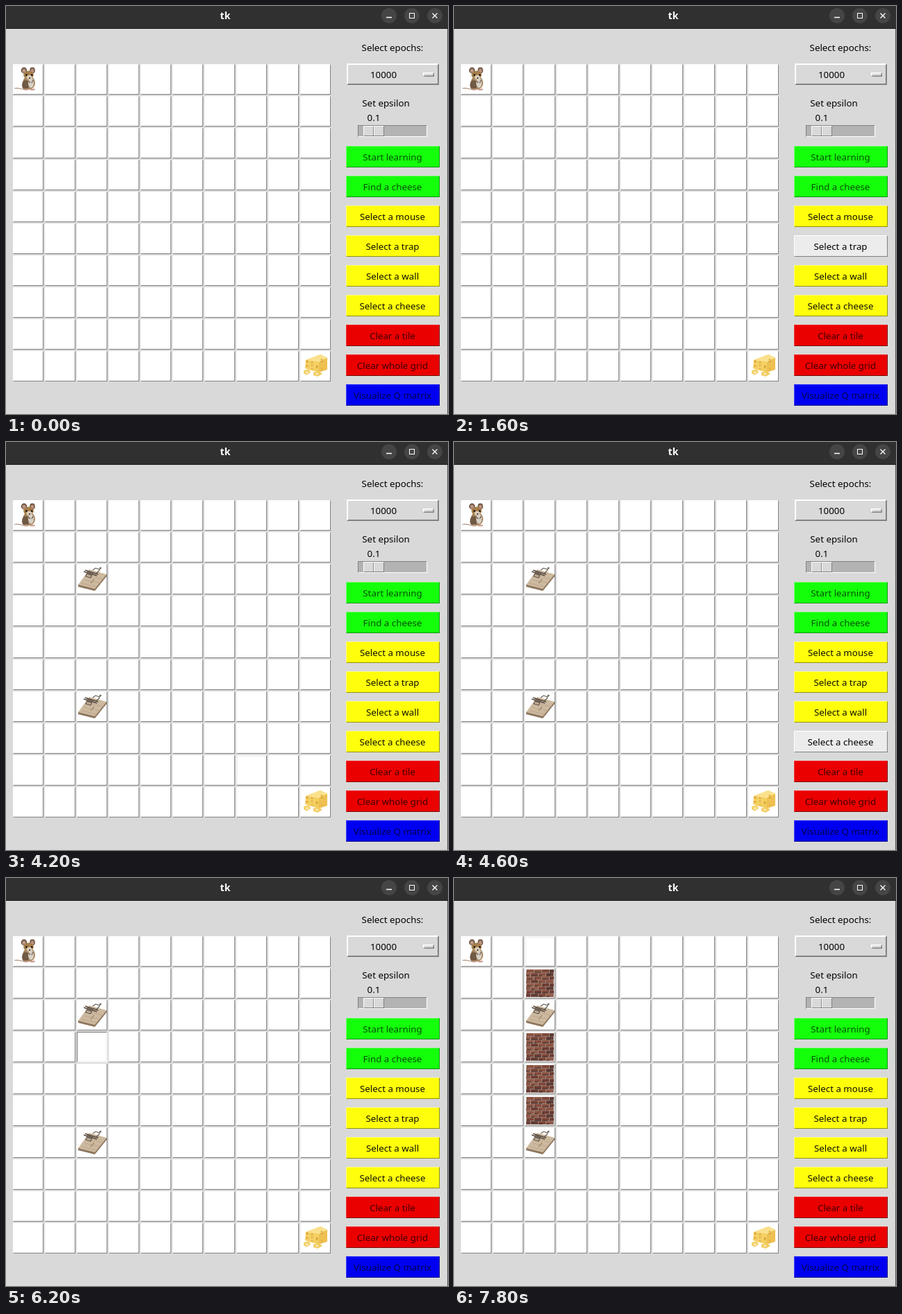
Recreate the animation shown at these times as an HTML page. Size 637 by 589 pixels, loop 8000 ms.

```html
<!DOCTYPE html>
<html lang="en">
<head>
<meta charset="utf-8">
<title>tk</title>
<style>
html, body { margin: 0; width: 100%; height: 100%; overflow: hidden; background: #d9d9d9; }
svg { display: block; width: 637px; height: 589px; }
text { font: 13.333px "Noto Sans", "Open Sans", sans-serif; text-anchor: middle; }
</style>
</head>
<body>
<svg id="stage" viewBox="0 0 637 589" xmlns="http://www.w3.org/2000/svg"></svg>
<script>
const LOOP = 8000, PITCH = 46, ACTIVE = '#ececec', LIGHT = '#fff', SHADE = '#828282';
const stage = document.getElementById('stage');

const rect = (x, y, w, h, fill, more = '') =>
  `<rect x="${x}" y="${y}" width="${w}" height="${h}" fill="${fill}" ${more}/>`;
const poly = (points, fill, more = '') => `<polygon points="${points}" fill="${fill}" ${more}/>`;
const line = (d, stroke, width = 1) =>
  `<path d="${d}" fill="none" stroke="${stroke}" stroke-width="${width}"/>`;
const oval = (x, y, rx, ry, fill) => `<ellipse cx="${x}" cy="${y}" rx="${rx}" ry="${ry}" fill="${fill}"/>`;
const label = (x, y, text, fill = '#000', more = '') =>
  `<text x="${x}" y="${y}" fill="${fill}" ${more}>${text}</text>`;

// Bevelled box: light top-left edge, dark bottom-right edge
function bevel(x, y, w, h, face, light, dark, b = 1) {
  return rect(x, y, w, h, dark) +
    poly(`${x},${y} ${x + w},${y} ${x + w - b},${y + b} ${x + b},${y + h - b} ${x},${y + h}`, light) +
    rect(x + b, y + b, w - 2 * b, h - 2 * b, face);
}

function mulberry(seed) {
  return () => {
    seed = seed + 0x6d2b79f5 | 0;
    let n = Math.imul(seed ^ seed >>> 15, 1 | seed);
    n = n + Math.imul(n ^ n >>> 7, 61 | n) ^ n;
    return ((n ^ n >>> 14) >>> 0) / 4294967296;
  };
}

function wallArt() {
  const rnd = mulberry(12);
  const tones = ['#7e4538', '#8d5141', '#6c3a32', '#925a49', '#5e3a33', '#84493b'];
  let s = rect(2, 2, 40, 40, '#a08b7e');
  for (let row = 0; row < 8; row++) {
    for (let x = row % 2 ? -4 : 1; x < 40; x += 11) {
      const left = Math.max(0, x), right = Math.min(40, x + 10);
      s += rect(2 + left, 2.3 + row * 5, right - left, 4.1, tones[rnd() * 6 | 0]);
      s += rect(2 + left, 5.4 + row * 5, (right - left) * rnd(), 1.2, '#43302b');
    }
  }
  return s;
}

const trapArt = () =>
  poly('2,30 2,33 26,39 43,18 43,15', '#8d775f') +
  poly('2,30 18,8 43,15 26,36', '#cdb99f') +
  line('M7 28 29 33 M11 23 34 28 M15 17 39 22', '#b9a287', .8) +
  line('M10 11 29 17 M12 9 31 15', '#55483e', 1.4) +
  line('M16 11 13 18 20 20 23 13 M23 9 27 6 33 8 35 5 M28 14 33 9', '#5d544b', 1.1) +
  poly('15,11 23,12 21,17 14,15', '#6f6256') +
  line('M25 22 20 28', '#a58d72', 1.4) +
  oval(34, 6, 1.5, 1.3, '#776a5e');

const mouseArt = () =>
  line('M20 36 C13 38 10 33 2 35', '#b08f7b', 1.2) +
  oval(23, 27, 9, 9.5, '#a4835c') +
  oval(18, 30, 5, 7, '#6f5a44') +
  oval(26, 27, 4, 7, '#d8d2ca') +
  oval(16, 9, 4.3, 4.4, '#6b533f') + oval(16, 9.5, 2.7, 3, '#bb9383') +
  oval(28, 9, 3.8, 4.4, '#6b533f') + oval(28, 9.5, 2.3, 3, '#bb9383') +
  oval(22.5, 15.5, 7.3, 6, '#a57d48') +
  oval(23.5, 19, 4, 3.3, '#d9cbb8') +
  oval(19.4, 15.5, 1.4, 1.6, '#201a17') + oval(27.2, 15.5, 1.3, 1.6, '#201a17') +
  oval(24, 20, 1.2, .9, '#493630') +
  line('M22 24 25 27 M29 23 27 27', '#72614f', 1.4) +
  oval(19, 36.5, 4, 1.3, '#c8a18d') + oval(28, 36.5, 4, 1.3, '#c8a18d');

function cheeseArt() {
  const rnd = mulberry(5);
  let s = poly('8,13 29,5 39,10 39,27 26,31 7,25', '#f4cf62') +
    poly('8,13 29,5 39,10 27,16', '#fbe18d') +
    poly('27,16 39,10 39,27 26,31', '#eec052') +
    poly('5,28 13,26 15,31 9,35 5,32', '#f5d36c') +
    poly('19,31 27,29 32,33 25,37 19,35', '#f3cd63');
  for (let i = 0; i < 13; i++) {
    s += oval(10 + (i * 7 % 28), 12 + rnd() * 14, .8 + rnd(), .7 + rnd() * .8, '#d9a239');
  }
  return s + oval(10, 31, 1.5, 1.4, '#fff3cc') + oval(24, 33, 1.7, 1.3, '#fff3cc');
}

const art = { mouse: mouseArt(), cheese: cheeseArt(), trap: trapArt(), wall: wallArt() };

const GREEN = ['#14ff0a', '#71ff6b', '#0b9406', '#084f06'];
const YELLOW = ['#ffff0c', '#ffff78', '#929208', '#101000'];
const RED = ['#eb0000', '#f53030', '#780000', '#3d0000'];
const BLUE = ['#0000f0', '#3838ff', '#000080', '#00004c'];
const buttons = [
  ['start', 'Start learning', GREEN], ['find', 'Find a cheese', GREEN],
  ['mouse', 'Select a mouse', YELLOW], ['trap', 'Select a trap', YELLOW],
  ['wall', 'Select a wall', YELLOW], ['cheese', 'Select a cheese', YELLOW],
  ['tile', 'Clear a tile', RED], ['grid', 'Clear whole grid', RED],
  ['matrix', 'Visualize Q matrix', BLUE],
];

// [time, widget under the pointer, pressed]; tiles are "row,col"
const pointer = [
  [0, ''], [400, 'tile'], [600, 'cheese'], [800, 'wall'], [1000, 'trap'],
  [1400, 'trap', 1], [1600, 'trap'], [1800, '5,8'], [2000, '3,4'], [2200, '2,2'],
  [2800, '2,2', 1], [3000, '2,2'], [3200, '6,2', 1], [3400, '6,2'],
  [3800, '7,4'], [4000, '8,6'], [4200, '8,7'], [4400, '8,9'], [4600, 'cheese'], [4800, 'wall'],
  [5000, 'wall', 1], [5200, 'wall'], [5400, '6,8'], [5600, '4,4'], [5800, '3,2'],
  [6200, '3,2', 1], [6400, '4,2', 1], [6600, '5,2', 1], [6800, '5,2'],
  [7000, '6,2'], [7200, '1,2'], [7400, '1,2', 1], [7600, '1,2'], [7800, '0,2'],
];

const placed = {
  '0,0': ['mouse', 0], '9,9': ['cheese', 0],
  '2,2': ['trap', 3000], '6,2': ['trap', 3400],
  '3,2': ['wall', 6400], '4,2': ['wall', 6600], '5,2': ['wall', 6800], '1,2': ['wall', 7600],
};

function drawTile(key, hover, press, t) {
  const [row, col] = key.split(',');
  const item = placed[key];
  const edges = press ? [SHADE, LIGHT] : [LIGHT, SHADE];
  return `<g transform="translate(${10 + col * PITCH} ${84 + row * PITCH})">` +
    bevel(0, 0, 44, 44, hover ? ACTIVE : LIGHT, ...edges) +
    (hover ? rect(2, 2, 40, 40, '#fff') : '') +
    (item && t >= item[1] ? art[item[0]] : '') + '</g>';
}

function drawButton(i, hover, press) {
  const [, text, colors] = buttons[i];
  let [face, light, dark, ink] = hover ? [ACTIVE, LIGHT, SHADE, '#000'] : colors;
  if (press) [light, dark] = [dark, light];
  const y = 202 + i * 43;
  return bevel(490, y, 135, 31, face, light, dark) + label(557, y + 21, text, ink);
}

function drawFrame() {
  const circles = [552, 585, 618].map(x => oval(x, 14, 11, 11, '#454545')).join('');
  return rect(0, 0, 637, 589, '#d9d9d9') + rect(0, 0, 637, 33, '#303030') +
    rect(0, 32, 637, 1, '#1f1f1f') + rect(636, 33, 1, 556, '#555') +
    label(316, 19, 'tk', '#fff', 'style="font-weight:700;font-size:14px"') + circles +
    line('M548 16.5h8 M614.5 10.5l7 7 M621.5 10.5l-7 7', '#fff', 1.3) +
    rect(581.5, 10.5, 7, 7, 'none', 'stroke="#fff"') +
    label(557, 65, 'Select epochs:') +
    bevel(491, 83, 133, 31, '#d9d9d9', LIGHT, SHADE, 2) + label(544, 104, '10000') +
    bevel(601, 96, 16, 6, '#d9d9d9', LIGHT, SHADE, 1.5) +
    label(547.5, 145, 'Set epsilon') + label(530, 166, '0.1') +
    bevel(507, 172, 100, 17, '#b3b3b3', SHADE, LIGHT) +
    bevel(515, 173, 30, 15, '#d9d9d9', LIGHT, SHADE) +
    rect(529, 174, 1, 13, SHADE) + rect(530, 174, 1, 13, LIGHT);
}

const widgets = [];
function addWidget(draw) {
  widgets.push({ draw, html: '' });
  return '<g class="w"></g>';
}

let markup = drawFrame();
for (let i = 0; i < 100; i++) {
  const key = `${i / 10 | 0},${i % 10}`;
  markup += addWidget((t, over, press) => drawTile(key, over === key, over === key && press, t));
}
buttons.forEach(([id], i) => {
  markup += addWidget((t, over, press) => drawButton(i, over === id, over === id && press));
});
stage.innerHTML = markup;
stage.querySelectorAll('.w').forEach((node, i) => widgets[i].node = node);

let lastStep = -1;
function update(t) {
  const step = Math.floor(t / 200);
  if (step === lastStep) return;
  lastStep = step;
  const [, over, press] = pointer.filter(p => p[0] <= t).pop();
  for (const w of widgets) {
    const html = w.draw(t, over, press);
    if (html !== w.html) w.node.innerHTML = w.html = html;
  }
}

const begin = performance.now();
function tick() {
  update((performance.now() - begin) % LOOP);
  requestAnimationFrame(tick);
}
tick();
</script>
</body>
</html>
```
